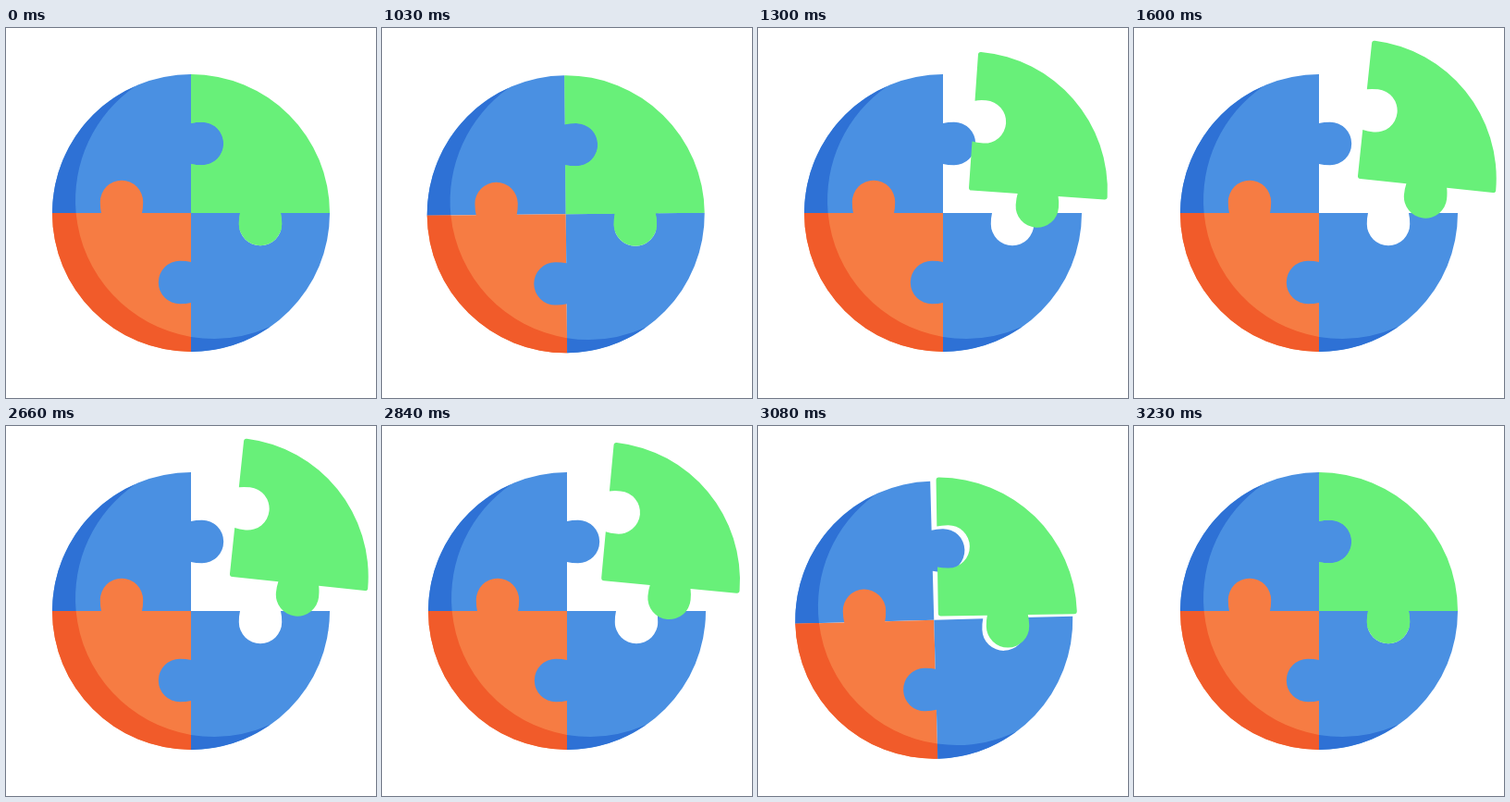
An HTML page for the animation above (3.26 s loop, 400 by 400 pixels).

```html
<!DOCTYPE html>
<html lang="en">
<head>
<meta charset="utf-8">
<title>Puzzle circle</title>
<style>
  html, body { margin: 0; width: 100%; height: 100%; overflow: hidden; background: #fff; }
  svg { display: block; width: 100vw; height: 100vh; }
</style>
</head>
<body>
<svg viewBox="-200 -200 400 400">
  <g id="base">
    <path id="backing" fill="#68f079" d="M0 0V-149A149 149 0 0 1 149 0H100A25 25 0 0 1 50 12V0Z"/>
    <g fill="#4a90e2">
      <path d="M0 0H-150A150 150 0 0 1 0 -150V-97q5 -1.2 12 -1.2a23.2 23.2 0 0 1 0 46.4q-7 0 -12 -1.2Z"/>
    </g>
    <path fill="#2e71d5" d="M-60.3 -137A150 150 0 0 0 -150 0H-124.35A150 150 0 0 1 -60.3 -137Z"/>
    <path fill="#f67c43" d="M0 0V150A150 150 0 0 1 -150 0H-97q-1.2 -5 -1.2 -12a23.2 23.2 0 0 1 46.4 0q0 7 -1.2 12Z"/>
    <path fill="#f15b2a" d="M-150 0A150 150 0 0 0 0 150V133.9A150 150 0 0 1 -124.35 0Z"/>
    <path fill="#4a90e2" d="M0 0H53q-1.2 5 -1.2 12a23.2 23.2 0 0 0 46.4 0q0 -7 -1.2 -12H150A150 150 0 0 1 0 150V97q-5 1.2 -12 1.2a23.2 23.2 0 0 1 0 -46.4q7 0 12 1.2Z"/>
    <path fill="#2e71d5" d="M0 150A150 150 0 0 0 85.3 123A150 150 0 0 1 0 133.9Z"/>
  </g>
  <path id="piece" fill="#68f079"/>
</svg>
<script>
  const LOOP = 3260, STEP = 30, STEPS = 20;
  const OUT = 1000, BACK = 2630;   // start of each move
  const PEAK = 4.5, SETTLE = 9.7;  // in steps
  const DIP = { x: -10, y: 10, a: -1.6 };
  const AWAY = { x: 41.7, y: -37.3, a: 6 };

  const [base, backing, piece] = ['base', 'backing', 'piece'].map(id => document.getElementById(id));

  const clamp = (v, lo, hi) => Math.min(hi, Math.max(lo, v));
  const smooth = u => u * u * (3 - 2 * u);
  const lerp = (a, b, u) => a + (b - a) * u;
  const place = (el, { x, y, a }) =>
    el.setAttribute('transform', `translate(${x} ${y}) rotate(${a})`);

  // Quarter with a socket on its left side, a knob below and corner radius r
  const quarter = r =>
    `M${r} 0Q0 0 0 ${-r}V-53q5 1.2 12 1.2a23.2 23.2 0 0 0 0 -46.4q-7 0 -12 1.2` +
    `V${r - 150}Q0 -150 ${r} -150A150 150 0 0 1 150 ${-r}Q150 0 ${150 - r} 0` +
    `H97q1.2 5 1.2 12a23.2 23.2 0 0 1 -46.4 0q0 -7 1.2 -12Z`;

  // Progress of the opening move in whole steps; closing runs it backwards
  function progress(t) {
    const n = start => clamp(Math.floor((t - start) / STEP + 1e-6), 0, STEPS);
    return n(OUT) - n(BACK);
  }

  function basePose(m) {
    const rising = m < PEAK;
    const u = rising ? m / PEAK : clamp((SETTLE - m) / (SETTLE - PEAK), 0, 1);
    const s = smooth(u);
    const turn = rising ? Math.sin(u * Math.PI / 2) : s;
    return { x: DIP.x * s, y: DIP.y * s, a: DIP.a * turn };
  }

  function awayPose(m) {
    const u = 1 - (1 - (m - PEAK) / (STEPS - PEAK)) ** 3;
    return { x: lerp(DIP.x, AWAY.x, u), y: lerp(DIP.y, AWAY.y, u), a: lerp(DIP.a, AWAY.a, u) };
  }

  function draw(t) {
    const m = progress(t), joined = m <= PEAK, pose = basePose(m);
    place(base, pose);
    place(piece, joined ? pose : awayPose(m));
    piece.setAttribute('d', quarter(joined ? 0 : 3));
    backing.setAttribute('visibility', joined ? 'visible' : 'hidden');
  }

  const begin = performance.now();
  function tick() {
    draw((performance.now() - begin) % LOOP);
    requestAnimationFrame(tick);
  }
  tick();
</script>
</body>
</html>
```
